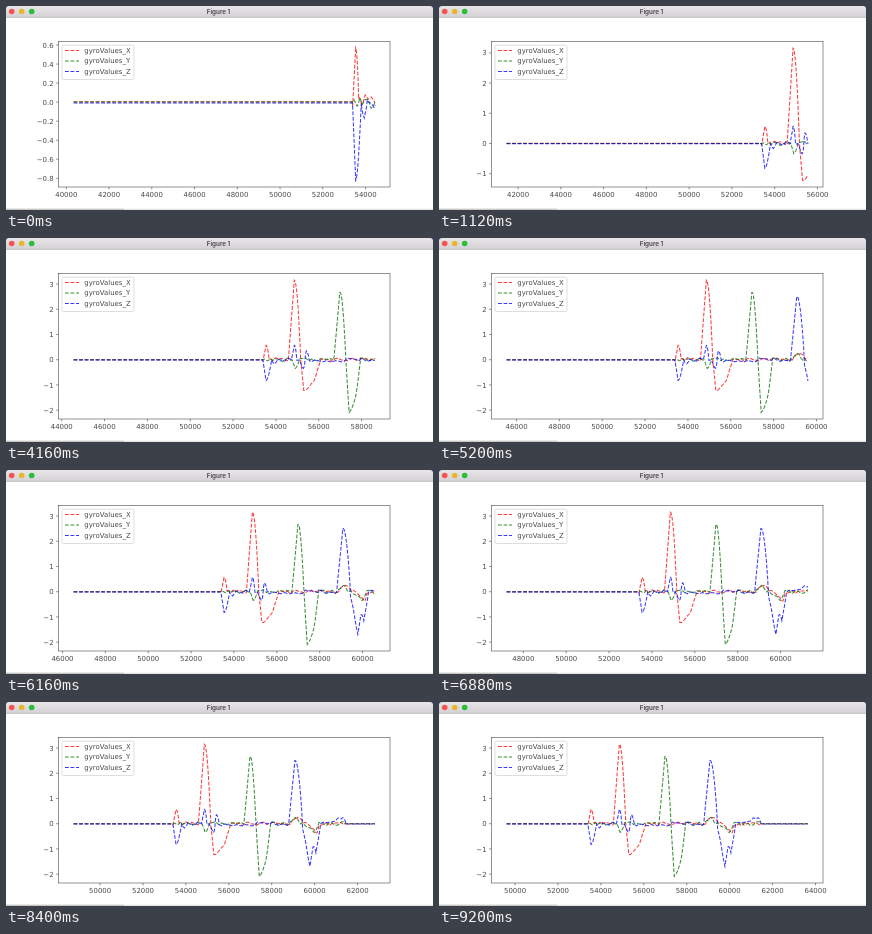
An HTML page with a canvas that plays this animation: 427x204 px, repeating every 9.28 s.

```html
<!DOCTYPE html>
<html lang="en">
<head>
<meta charset="utf-8">
<title>Figure 1</title>
<style>
  html, body { margin: 0; width: 100%; height: 100%; overflow: hidden; background: #fff; }
  canvas { display: block; width: 427px; height: 204px; }
</style>
</head>
<body>
<canvas id="stage"></canvas>
<script>
const LOOP = 9280, TICK = 80, SAMPLE = 139.5, STEP = 20;
const MOVING_FROM = 53400, MOVING_TO = 61400;
const BOX = { left: 52.5, right: 384, top: 35.5, bottom: 181 };
const FONT = '6.94px "DejaVu Sans", sans-serif';
const INK = '#4a4a4a';

// Each axis is a sum of pulses: peak time, height, rise and fall durations.
const SERIES = [
  { name: 'gyroValues_X', color: '#f00', rest: 0.003, pulses: [
    [53540, .62, 140, 140],
    [54860, 3.2, 280, 300], [55300, -1.24, 140, 800],
    [59160, .3, 300, 320], [60060, -.35, 500, 140]
  ] },
  { name: 'gyroValues_Y', color: '#006c00', rest: 0.002, pulses: [
    [53600, -.1, 140, 140], [54900, -.38, 140, 200],
    [56980, 2.65, 280, 290], [57420, -2.09, 150, 540],
    [59100, .25, 280, 260], [59960, -.28, 500, 240]
  ] },
  { name: 'gyroValues_Z', color: '#00f', rest: -0.01, pulses: [
    [53540, -.8, 140, 260], [53940, -.2, 140, 140],
    [54860, .63, 140, 120], [55280, -.32, 200, 100], [55420, .35, 80, 140],
    [59080, 2.48, 290, 360], [59780, -1.65, 380, 500], [59920, .65, 140, 140],
    [61300, .3, 500, 160]
  ] }
];

function pulse(t, [peak, height, rise, fall]) {
  if (t <= peak - rise || t >= peak + fall) return 0;
  return height * (t < peak ? 1 - (peak - t) / rise : 1 - ((t - peak) / fall) ** 2);
}

function random(n) {
  const v = Math.sin(n * 12.9898) * 43758.5453;
  return v - Math.floor(v);
}

// Jagged wobble, one random reading per sample.
function wobble(t, seed) {
  if (t < MOVING_FROM || t > MOVING_TO) return 0;
  const i = Math.floor(t / SAMPLE), u = t / SAMPLE - i;
  const reading = n => random(n + seed * 1000) * 0.16 - 0.08;
  return reading(i) * (1 - u) + reading(i + 1) * u;
}

function valueAt(index, t) {
  const { rest, pulses } = SERIES[index];
  return pulses.reduce((sum, p) => sum + pulse(t, p), rest + wobble(t, index));
}

function trace(index, first, last) {
  const points = [[first, valueAt(index, first)]];
  for (let t = Math.ceil(first / STEP) * STEP; t < last; t += STEP) {
    points.push([t, valueAt(index, t)]);
  }
  points.push([last, valueAt(index, last)]);
  return points;
}

const canvas = document.getElementById('stage');
const ratio = window.devicePixelRatio || 1;
canvas.width = 427 * ratio;
canvas.height = 204 * ratio;
const ctx = canvas.getContext('2d');
ctx.scale(ratio, ratio);

function stroke(points, color, width, dash = []) {
  ctx.strokeStyle = color;
  ctx.lineWidth = width;
  ctx.setLineDash(dash);
  ctx.beginPath();
  points.forEach(([x, y]) => ctx.lineTo(x, y));
  ctx.stroke();
  ctx.setLineDash([]);
}

function dashed(points, color) {
  ctx.globalAlpha = 0.78;
  stroke(points, color, 1.04, [3.85, 1.67]);
  ctx.globalAlpha = 1;
}

function text(label, x, y, align, font = FONT, color = INK) {
  ctx.font = font;
  ctx.fillStyle = color;
  ctx.textAlign = align;
  ctx.fillText(label, x, y);
}

function ticks(min, max) {
  const power = 10 ** Math.floor(Math.log10((max - min) / 9));
  const step = [1, 2, 2.5, 5, 10].map(m => m * power).find(v => (max - min) / v <= 9);
  const digits = [0, 1, 2, 3].find(d => Math.abs(step - step.toFixed(d)) < 1e-9);
  const list = [];
  for (let i = Math.ceil(min / step); i * step <= max; i++) {
    list.push([i * step, (i * step).toFixed(digits).replace('-', '\u2212')]);
  }
  return list;
}

function drawWindow() {
  ctx.fillStyle = '#fff';
  ctx.fillRect(0, 0, 427, 204);
  ctx.fillStyle = '#34348c';
  ctx.fillRect(0, 0, 427, 4);
  const bar = ctx.createLinearGradient(0, 0, 0, 12);
  bar.addColorStop(0, '#e8e6e8');
  bar.addColorStop(1, '#d2d0d2');
  ctx.fillStyle = bar;
  ctx.beginPath();
  ctx.roundRect(0, 0, 427, 12, [3, 3, 0, 0]);
  ctx.fill();
  ctx.fillStyle = '#bebcbe';
  ctx.fillRect(0, 11.5, 427, 0.5);
  ['#fc5550', '#e8b62e', '#28c038'].forEach((color, i) => {
    ctx.fillStyle = color;
    ctx.beginPath();
    ctx.arc(5.7 + 10 * i, 5.5, 2.8, 0, 7);
    ctx.fill();
  });
  text('Figure 1', 212.5, 7.6, 'center', '600 6.3px Inter, sans-serif', '#464446');
  ctx.fillStyle = '#e4e4e4';
  ctx.fillRect(0, 202.7, 427, 1.3);
  ctx.fillStyle = '#c8c8c8';
  ctx.fillRect(0, 202.7, 118, 1.3);
}

function drawLegend() {
  ctx.fillStyle = 'rgba(255,255,255,.8)';
  ctx.strokeStyle = '#d0d0d0';
  ctx.lineWidth = 0.7;
  ctx.beginPath();
  ctx.roundRect(56, 39.2, 72, 34.3, 1.4);
  ctx.fill();
  ctx.stroke();
  SERIES.forEach(({ name, color }, i) => {
    const y = 44.5 + 10.5 * i;
    dashed([[59, y], [73, y]], color);
    text(name, 78.3, y + 2.3, 'left');
  });
}

function drawPlot(first, last) {
  const lines = SERIES.map((_, i) => trace(i, first, last));
  const values = lines.flat().map(p => p[1]);
  const low = Math.min(...values), high = Math.max(...values);
  const padX = (last - first) * 0.05, padY = (high - low) * 0.05;
  const minX = first - padX, maxX = last + padX;
  const minY = low - padY, maxY = high + padY;
  const px = t => BOX.left + (t - minX) / (maxX - minX) * (BOX.right - BOX.left);
  const py = v => BOX.bottom - (v - minY) / (maxY - minY) * (BOX.bottom - BOX.top);

  lines.forEach((line, i) =>
    dashed(line.map(([t, v]) => [px(t), py(v)]), SERIES[i].color));

  for (const [v, label] of ticks(minX, maxX)) {
    const x = px(v);
    stroke([[x, BOX.bottom], [x, BOX.bottom + 2.4]], INK, 0.6);
    text(label, x, BOX.bottom + 10.2, 'center');
  }
  for (const [v, label] of ticks(minY, maxY)) {
    const y = py(v);
    stroke([[BOX.left, y], [BOX.left - 2.4, y]], INK, 0.6);
    text(label, BOX.left - 4.9, y + 2.6, 'right');
  }
  ctx.strokeStyle = INK;
  ctx.lineWidth = 0.6;
  ctx.strokeRect(BOX.left, BOX.top, BOX.right - BOX.left, BOX.bottom - BOX.top);
}

// The window moves on by one reading whenever a new sample arrives.
function render(now) {
  const t = Math.floor(now % LOOP / TICK) * TICK;
  const samples = Math.floor(t / SAMPLE + 0.2);
  drawWindow();
  drawPlot(40340 + 140.4 * samples, 54440 + SAMPLE * samples);
  drawLegend();
}

const start = performance.now();
function loop() {
  render(performance.now() - start);
  requestAnimationFrame(loop);
}
loop();
</script>
</body>
</html>
```
